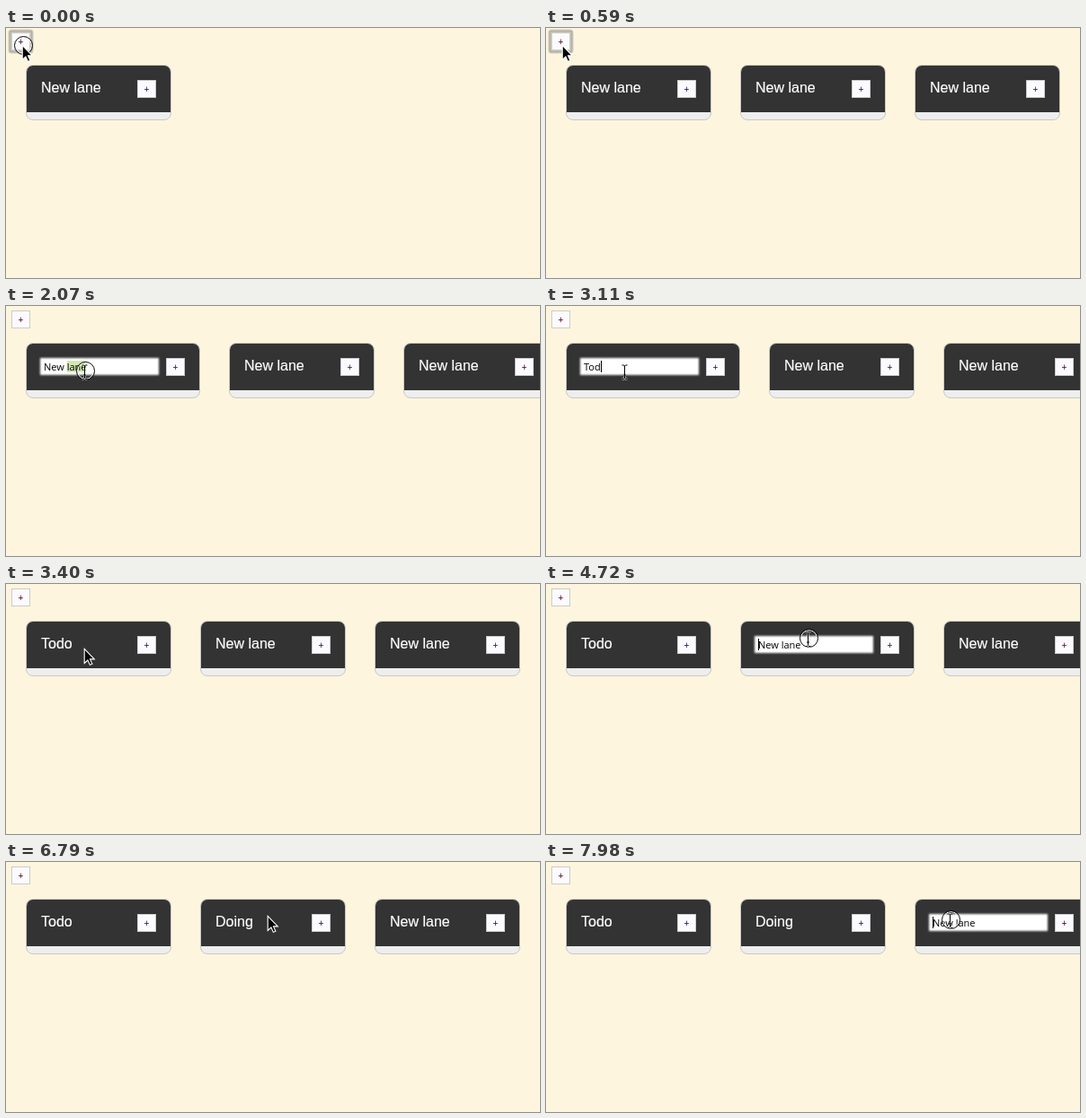
These frames come from a looping animation (594x279 px, 8000 ms). An HTML page:

```html
<!DOCTYPE html>
<html lang="en">
<head>
<meta charset="utf-8">
<title>Kanban lanes</title>
<style>
  html, body { margin: 0; width: 100%; height: 100%; overflow: hidden; background: #fdf5dd; }
  svg { display: block; width: 594px; height: 279px; }
  .title { font: 16px "Liberation Sans", Arial, sans-serif; fill: #fff; stroke: #fff; stroke-width: .2px; }
  .input { font: 11px "Open Sans", sans-serif; fill: #000; }
  .plus { font: 10px "Liberation Sans", Arial, sans-serif; text-anchor: middle; }
</style>
</head>
<body>
<svg viewBox="0 0 594 279">
  <defs>
    <filter id="glow" x="-10%" y="-50%" width="120%" height="200%"><feGaussianBlur stdDeviation="1.1"/></filter>
    <path id="arrow" d="M.7 1.2V17.2L4.4 13.8L6.9 19.2L9.4 18.1L7 12.7H11.8Z"
      fill="#000" stroke="#fff" stroke-width="1.1"/>
    <g id="ibeam" fill="none">
      <path id="beam" d="M-3.5 -7.5H-1.5L-.5 -6.5L.5 -7.5H2.5M-.5 -6.5V7M-3.5 8H-1.5L-.5 7L.5 8H2.5M-2 3.5H1"
        stroke="#fff" stroke-opacity=".45" stroke-width="2"/>
      <use href="#beam"/>
      <path d="M-3.5 -7.5H-1.5L-.5 -6.5L.5 -7.5H2.5M-.5 -6.5V7M-3.5 8H-1.5L-.5 7L.5 8H2.5M-2 3.5H1" stroke="#000"/>
    </g>
    <g id="ring" fill="none">
      <circle r="9" stroke="#fff"/>
      <circle r="10" stroke="#000"/>
    </g>
  </defs>
  <g id="scene"></g>
</svg>
<script>
const LOOP = 8000;
const scene = document.getElementById('scene');
const pen = document.createElement('canvas').getContext('2d');
const textWidth = text => {
  pen.font = '11px "Open Sans", sans-serif';
  return pen.measureText(text).width;
};

const NEW = 'New lane';
const at = (x, y) => ({ x, y });
const press = { click: true };
const release = { click: false };
const edit = lane => ({ edit: lane, text: NEW, caret: 0, sel: null, focus: false, click: true });
const select = from => ({ sel: from, click: true });
const type = text => ({ text, sel: null, caret: text.length });
const save = titles => ({ titles, edit: -1 });

// Each step is a time in ms and the state that changes then.
const steps = [
  [0, { x: 19, y: 19, titles: [NEW], edit: -1, focus: true, click: true }],
  [150, { titles: [NEW, NEW], click: false }],
  [440, press],
  [590, { titles: [NEW, NEW, NEW], click: false }],
  [880, at(25, 30)],
  [1030, at(45, 60)],
  [1180, at(66, 83)],
  [1330, at(82, 86)],
  [1470, at(88, 72)],
  [1620, edit(0)],
  [1770, release],
  [2070, select(4)],
  [2220, select(0)],
  [2360, release],
  [2810, type('T')],
  [3110, type('Tod')],
  [3260, type('Todo')],
  [3400, save(['Todo', NEW, NEW])],
  [3850, at(102, 66)],
  [4000, at(150, 39)],
  [4140, at(206, 29)],
  [4290, at(256, 38)],
  [4430, at(284, 52)],
  [4580, at(292, 60)],
  [4720, edit(1)],
  [4870, release],
  [5310, select(4)],
  [5460, select(0)],
  [5610, release],
  [6050, type('D')],
  [6200, type('Do')],
  [6350, type('Doi')],
  [6500, type('Doing')],
  [6790, save(['Todo', 'Doing', NEW])],
  [7090, at(302, 57)],
  [7240, at(342, 58)],
  [7390, at(392, 61)],
  [7540, at(430, 64)],
  [7680, at(446, 64)],
  [7980, { ...edit(2), ...at(450, 64) }],
];

const rect = (x, y, w, h, attrs) => `<rect x="${x}" y="${y}" width="${w}" height="${h}" ${attrs}/>`;

const addButton = (x, y, color) =>
  rect(x + .5, y + .5, 20, 19, 'fill="#fbfbff" stroke="#cbcbcb"') +
  `<text class="plus" x="${x + 10.5}" y="${y + 14}" fill="${color}">+</text>`;

const focusRing = () =>
  rect(3.5, 2.5, 26, 25, 'rx="2.5" fill="none" stroke="#cfcabb" stroke-width="2"') +
  rect(4.7, 3.7, 23.6, 22.6, 'rx="1.5" fill="none" stroke="#b2afa4" stroke-width="2"');

function inputBox(x, { text, sel, caret }) {
  const left = x + 20;
  let out = rect(x + 16, 58, 132, 19, 'fill="#fff" filter="url(#glow)"') +
    rect(x + 18, 60, 128, 15, 'fill="#fff"');
  if (sel !== null) {
    const from = textWidth(text.slice(0, sel));
    out += rect(left + from, 61, textWidth(text) - from, 13, 'fill="#d3e9b0"');
  } else {
    out += rect(Math.round(left + textWidth(text.slice(0, caret))), 61, 1, 13, 'fill="#000"');
  }
  return out + `<text class="input" x="${left}" y="72">${text}</text>`;
}

function lane(x, title, state, editing, shifted) {
  const w = editing ? 194 : 162;
  const head = `M${x + 1} 94V49a7 7 0 0 1 7 -7H${x + w - 8}a7 7 0 0 1 7 7V94Z`;
  return rect(x + .5, 41.5, w - 1, 61, 'rx="7.5" fill="#eee" stroke="#c8c8c8"') +
    `<path d="${head}" fill="#333"/>` +
    (editing ? inputBox(x, state) : `<text class="title" x="${x + 17}" y="72">${title}</text>`) +
    addButton(x + w - 38, 58, shifted ? '#4a0a18' : '#14145c');
}

function pointer({ x, y, click, edit }) {
  const put = (id, px, py) => `<use href="#${id}" x="${px}" y="${py}"/>`;
  return (click ? put('ring', x + .5, y + .5) : '') +
    (edit < 0 ? put('arrow', x - 1.5, y - .8) : put('ibeam', x, y + 1.5));
}

function draw(state) {
  let x = 22;
  let out = (state.focus ? focusRing() : '') + addButton(6, 5, '#4a0a18');
  state.titles.forEach((title, i) => {
    const editing = i === state.edit;
    out += lane(x, title, state, editing, state.edit >= 0 && i >= state.edit);
    x += editing ? 226 : 194;
  });
  scene.innerHTML = out + pointer(state);
}

let shown = -1;
const start = performance.now();
function tick() {
  const t = (performance.now() - start) % LOOP;
  const count = steps.filter(([time]) => time <= t).length;
  if (count !== shown) {
    shown = count;
    draw(Object.assign({}, ...steps.slice(0, count).map(step => step[1])));
  }
  requestAnimationFrame(tick);
}
tick();
</script>
</body>
</html>
```
